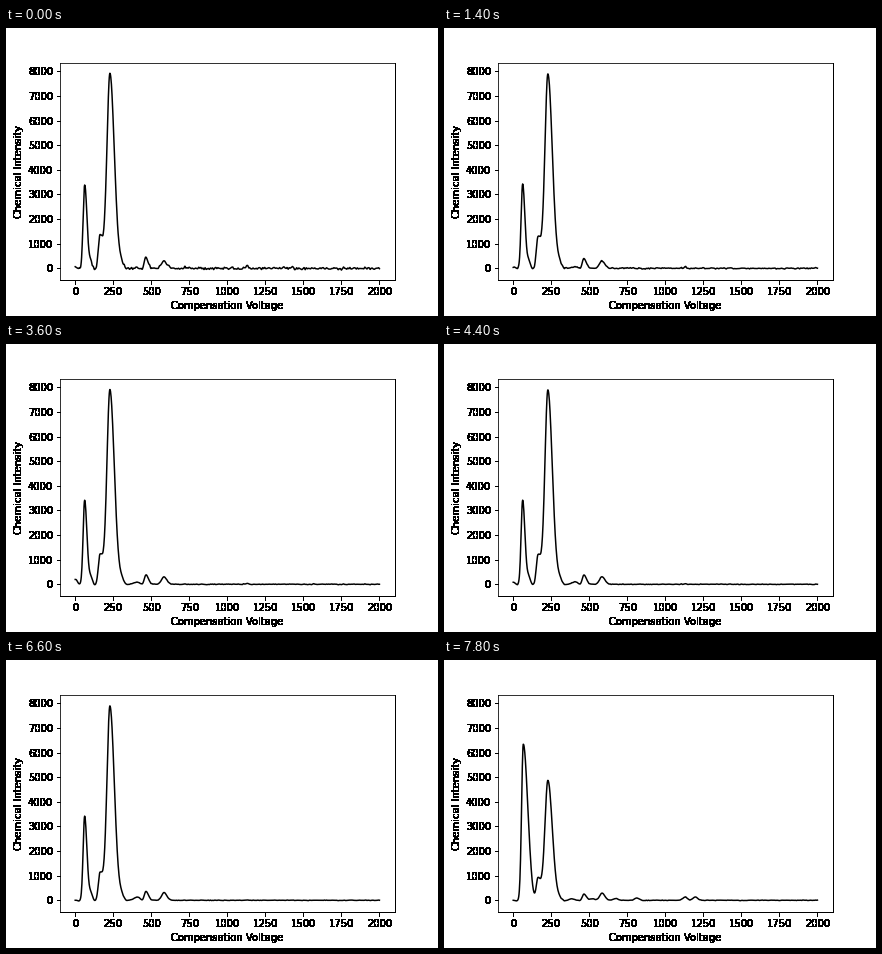
A matplotlib script that plays this animation: 432 by 288 pixels, repeating every 8 s.

```python
import numpy as np
import matplotlib.pyplot as plt
from matplotlib.animation import FuncAnimation

FRAMES, STEP = 40, 200
DRIFT_START, DRIFT_TIME = 6700, 1100

plt.rcParams["font.family"] = "DejaVu Sans"
x = np.linspace(0, 2000, 1001)


def peak(centre, left, right=None):
    width = np.where(x < centre, left, right or left)
    return np.exp(-0.5 * ((x - centre) / width) ** 2)


def ripple(seed, gap=7):
    knots = np.arange(0, 2000 + gap, gap)
    return np.interp(x, knots, np.random.default_rng(seed).normal(size=knots.size))


def signal(frame):
    t = frame * STEP
    settle = min(t / DRIFT_START, 1)
    drift = np.clip((t - DRIFT_START) / DRIFT_TIME, 0, 1)

    # first peak with its tail, shoulder, main peak with its tail
    y = (3420 + 2870 * drift) * peak(62 + 4 * drift, 10 + drift, 15 + 12 * drift)
    y += (280 + 170 * drift) * peak(102 + 2 * drift, 11 + 7 * drift)
    y += (1310 - 200 * settle - 210 * drift) * peak(163, 11, 22)
    y += (7890 - 3030 * drift) * peak(228, 19.5, 29)
    y += (170 - 110 * drift) * peak(304, 14)

    # small bumps
    swell = np.exp(-((t - 3600) / 800) ** 2)
    y += (50 * (1 - settle) + 180 * swell) * peak(0, 15)
    y += (40 + 90 * settle) * (1 - drift) * peak(410, 24, 15)
    y += (410 - 50 * settle - 110 * drift) * peak(465, 11, 16)
    y += (310 - 20 * drift) * peak(584, 16, 18)
    y += 90 * np.exp(-t / 3000) * peak(1130, 10)
    for centre in (385, 520, 675, 812, 1130, 1197):
        y += drift * (60 + max(centre - 520, 0) / 9) * peak(centre, 15)
    for centre in (24, 128, 340, 442):
        y -= 25 * peak(centre, 8)

    noise = 0.7 * (ripple(7) + ripple(500 + frame))
    return y + (6 + 24 * np.exp(-t / 1500)) * noise


def harden(image, dpi):
    """Turn every touched pixel fully opaque."""
    image = image.copy()
    image[..., 3] = image[..., 3] > 0
    return image, 0, 0


fig = plt.figure(figsize=(6, 4), dpi=72, facecolor="white")
ax = fig.add_axes([0.125, 0.125, 0.775, 0.755])
line, = ax.plot(x, signal(0), color="black", lw=1.5)
ax.set(xlim=(-100, 2101), ylim=(-476, 8355),
       xticks=range(0, 2001, 250), yticks=range(0, 8001, 1000),
       xlabel="Compensation Voltage", ylabel="Chemical Intensity")

outside = [ax.xaxis.label, ax.yaxis.label, ax.spines["right"], ax.spines["bottom"]]
outside += ax.get_xticklabels() + ax.get_yticklabels()
outside += ax.get_xticklines() + ax.get_yticklines()
for artist in outside:
    artist.set_agg_filter(harden)


def update(frame):
    line.set_ydata(signal(frame))
    return line,


anim = FuncAnimation(fig, update, frames=FRAMES, interval=STEP,
                     repeat=True, repeat_delay=0, blit=False)
plt.show()
```
